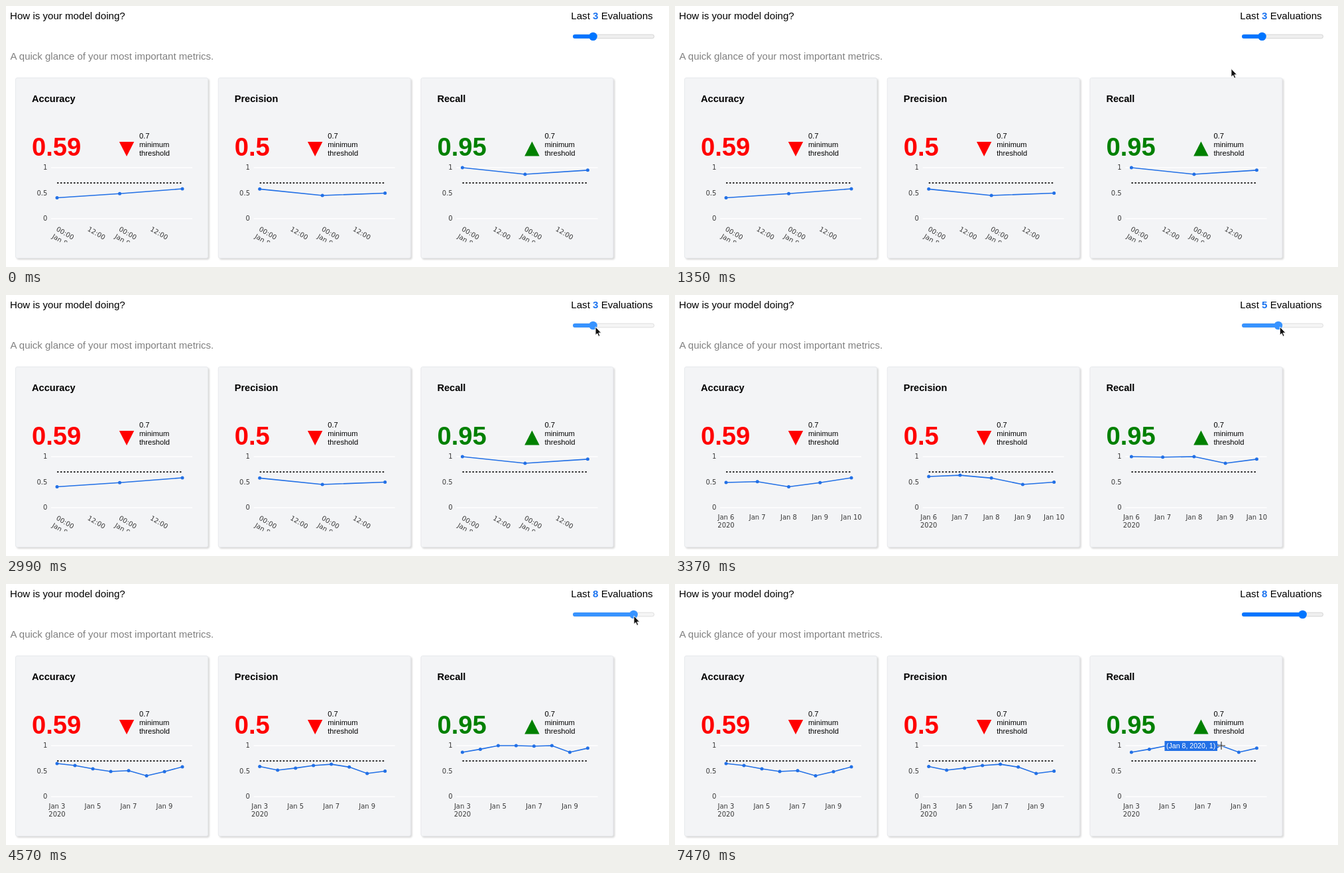
Animation, 1000 px wide and 394 px high, one loop 8 s. Source, as an HTML page:

```html
<!DOCTYPE html>
<html lang="en">
<head>
<meta charset="utf-8">
<title>Model metrics</title>
<style>
  html, body { margin: 0; width: 100%; height: 100%; overflow: hidden; background: #fff; }
  svg { display: block; width: 100%; height: 100%; font: 15.1px "Liberation Sans", Arial, sans-serif; }
  .card { fill: #f3f4f6; stroke: #e7e9ec; filter: drop-shadow(2px 2px 1.2px #dadada); }
  .title { font-size: 14.6px; font-weight: bold; }
  .score { font-size: 38.2px; font-weight: bold; }
  .note { font-size: 11.2px; }
  .tick { font: 10px "DejaVu Sans", Verdana, sans-serif; fill: #3a3a3a; }
  .grid { stroke: #fff; stroke-width: 1.6; }
  .limit { stroke: #111; stroke-width: 1.7; stroke-dasharray: 2.5 2.5; }
  .line { fill: none; stroke: #2270e6; stroke-width: 1.6; }
  .dot { fill: #2270e6; }
</style>
</head>
<body>
<svg viewBox="0 0 1000 394">
  <defs><clipPath id="plot"><rect x="30" y="230" width="260" height="126.5"/></clipPath></defs>
  <text x="6" y="20">How is your model doing?</text>
  <text x="6.5" y="81" font-size="15" fill="#808080">A quick glance of your most important metrics.</text>
  <text x="852.3" y="20">Last <tspan id="count" font-weight="bold" fill="#1a73f0">3</tspan> Evaluations</text>
  <rect id="track" x="855.5" y="43.1" width="122" height="5.8" rx="2.9"/>
  <rect id="fill" x="855" y="42.9" height="6.2" rx="3.1"/>
  <circle id="thumb" cy="46" r="6.3"/>
  <g id="cards"></g>
  <g id="hint">
    <path fill="#2270e6" d="M738.5 237H818V241L823.5 244.3L818 248V252H738.5Z"/>
    <text x="741" y="248.2" font-size="10.6" fill="#fff">(Jan 8, 2020, 1)</text>
  </g>
  <g id="cursor">
    <path id="arrow" fill="#111" stroke="#fff" stroke-width=".9"
      d="M0 0V12.6L2.8 10L4.7 14.5L6.8 13.6L4.9 9.2H8.7Z"/>
    <path id="beam" fill="none" stroke="#333"
      d="M-2.5 -6.5Q0 -6.5 0 -4.5Q0 -6.5 2.5 -6.5M0 -4.5V4.5M-2.5 6.5Q0 6.5 0 4.5Q0 6.5 2.5 6.5M-1.5 2H1.5"/>
    <g id="cross" fill="none">
      <path d="M-6 0H6M0 -6V6" stroke="#fff" stroke-width="2.6"/>
      <path d="M-6 0H6M0 -6V6" stroke="#222" stroke-width="1.1"/>
    </g>
  </g>
</svg>
<script>
const LOOP = 8000, LAST_DAY = 10, LEFT = 77, SPAN = 189;
const metrics = [
  { name: 'Accuracy', score: 0.59, noteX: 201, values: [.65, .61, .545, .494, .51, .41, .49, .585] },
  { name: 'Precision', score: 0.5, noteX: 179.5, values: [.59, .52, .56, .61, .635, .58, .455, .5] },
  { name: 'Recall', score: 0.95, noteX: 201, values: [.87, .93, 1, 1, .99, 1, .87, .95] }
];
// Pointer waypoints: time, x, y
const path = [
  [300, 600, 396], [880, 632.3, 172], [1440, 878, 80], [1910, 888, 58], [2300, 889, 57], [2500, 889, 48],
  [2990, 889, 48], [3750, 935.5, 48], [3840, 937.5, 48], [4050, 946, 48], [4570, 947, 48],
  [5720, 947, 48], [6280, 828, 216], [6680, 825, 243], [7110, 824, 244]
];
// Slider colours: fill, track, track edge
const looks = {
  normal: ['#0075ff', '#efefef', '#cfcfcf'],
  hover: ['#005cc8', '#e5e5e5', '#b8b8b8'],
  active: ['#3793ff', '#f5f5f5', '#d8d8d8']
};

const $ = id => document.getElementById(id);
const set = (id, attrs) => { for (const k in attrs) $(id).setAttribute(k, attrs[k]); };
const show = (id, on) => set(id, { visibility: on ? 'visible' : 'hidden' });
const yOf = value => 321 - 77 * value;
const text = (cls, x, y, s, extra = '') => `<text class="${cls}" x="${x}" y="${y}" ${extra}>${s}</text>`;
const rule = (cls, y, x1, x2) => `<path class="${cls}" d="M${x1} ${y}H${x2}"/>`;

function cardFrame({ name, score, noteX }, i) {
  const good = score >= 0.7, color = good ? 'green' : 'red', mid = noteX - 19;
  const [base, tip] = good ? [226.5, 204.5] : [205, 227];
  return `<g transform="translate(${i * 305.7} 0)">
    <rect class="card" x="14.5" y="108.5" width="290" height="272" rx="2.5"/>
    ${text('title', 39, 145, name)}
    ${text('score', 39, 226.3, score, `fill="${color}"`)}
    <path fill="${color}" d="M${mid - 11.2} ${base}h22.4L${mid} ${tip}Z"/>
    ${['0.7', 'minimum', 'threshold'].map((s, k) => text('note', noteX, 200.3 + 13 * k, s)).join('')}
    ${rule('grid', 244, 68, 281)}${rule('grid', 321, 68, 281)}
    ${[0, 0.5, 1].map(v => text('tick', 62.3, yOf(v) + 3.3, v, 'text-anchor="end"')).join('')}
    ${rule('limit', yOf(0.7), LEFT, LEFT + SPAN)}
    <g id="chart${i}" clip-path="url(#plot)"></g>
  </g>`;
}

function dateTicks(count, xOfDay) {
  const first = LAST_DAY - count + 1;
  let out = '';
  if (count === 3) {
    for (let day = 8; day < LAST_DAY; day += 0.5) {
      const midnight = day % 1 === 0;
      out += `<g transform="translate(${xOfDay(day) - 2} 338.8) rotate(30)">`
        + text('tick', 0, 0, midnight ? '00:00' : '12:00')
        + (midnight ? text('tick', 0, 12.5, 'Jan ' + day) : '') + '</g>';
    }
    return out;
  }
  const step = count < 6 ? 1 : 2;
  const start = step === 2 && first % 2 === 0 ? first + 1 : first;
  for (let day = start; day <= LAST_DAY; day += step) {
    const x = xOfDay(day);
    out += text('tick', x, 338.8, 'Jan ' + day, 'text-anchor="middle"');
    if (day === start) out += text('tick', x, 351.3, 2020, 'text-anchor="middle"');
  }
  return out;
}

let drawnCount = 0;
function drawCharts(count) {
  if (count === drawnCount) return;
  drawnCount = count;
  const xOfDay = day => LEFT + (day - LAST_DAY + count - 1) * SPAN / (count - 1);
  metrics.forEach(({ values }, i) => {
    const points = values.slice(-count).map((v, k) => [LEFT + k * SPAN / (count - 1), yOf(v)]);
    $('chart' + i).innerHTML = `<polyline class="line" points="${points.join(' ')}"/>`
      + points.map(([x, y]) => `<circle class="dot" cx="${x}" cy="${y}" r="2.5"/>`).join('')
      + dateTicks(count, xOfDay);
  });
}

function pointerAt(t) {
  const next = path.findIndex(p => p[0] > t);
  if (next <= 0) return path[next < 0 ? path.length - 1 : 0].slice(1);
  const [t0, x0, y0] = path[next - 1], [t1, x1, y1] = path[next];
  const k = (t - t0) / (t1 - t0);
  return [x0 + (x1 - x0) * k, y0 + (y1 - y0) * k];
}

function render(t) {
  const [x, y] = pointerAt(t);
  const count = t < 2990 ? 3 : t > 4050 ? 8 : Math.round(3 + (x - 889) / 12.2);
  const look = t >= 2690 && t < 5390 ? 'active' : y < 54 ? 'hover' : 'normal';
  const [blue, track, edge] = looks[look];
  const thumbX = 861 + (count - 1) * 12.23;

  $('count').textContent = count;
  set('track', { fill: track, stroke: edge, 'stroke-width': 0.8 });
  set('fill', { fill: blue, width: thumbX - 855 });
  set('thumb', { fill: blue, cx: thumbX });
  drawCharts(count);

  const overText = t > 6000 && y > 192 && y < 230, overPlot = t > 6000 && y >= 230;
  set('cursor', { transform: `translate(${x} ${y})` });
  show('arrow', !overText && !overPlot);
  show('beam', overText);
  show('cross', overPlot);
  show('hint', t >= 6680);
}

$('cards').innerHTML = metrics.map(cardFrame).join('');
const begin = performance.now();
function tick() {
  render((performance.now() - begin) % LOOP);
  requestAnimationFrame(tick);
}
tick();
</script>
</body>
</html>
```
